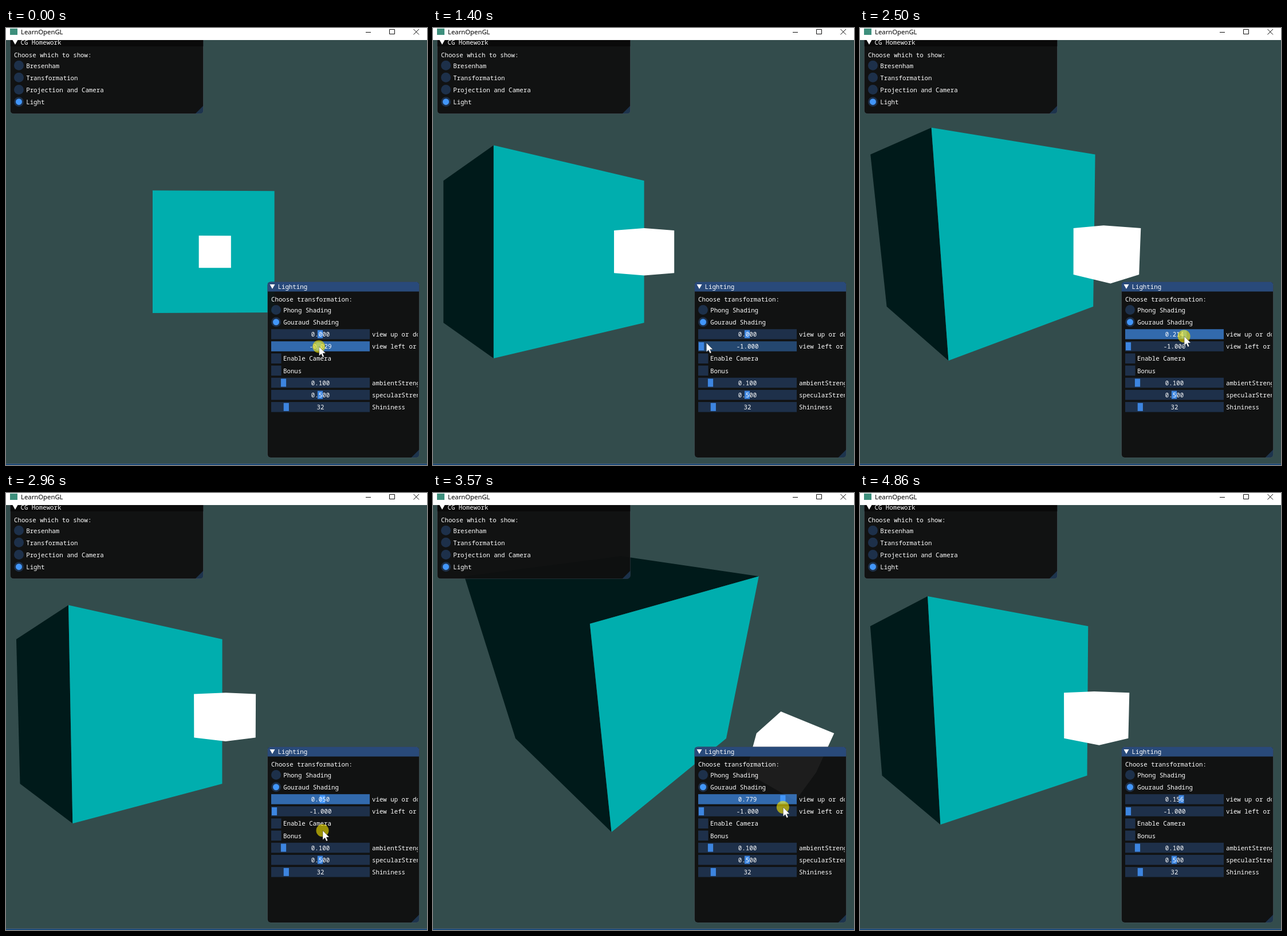
Write an HTML page with a canvas that moves like this. It is 735 px wide and 762 px high and loops after 5.15 s.

```html
<!DOCTYPE html>
<html lang="en">
<head>
<meta charset="utf-8">
<title>LearnOpenGL</title>
<style>
  html, body { margin: 0; width: 100%; height: 100%; overflow: hidden; background: #334c4c; }
  canvas { display: block; }
</style>
</head>
<body>
<canvas id="stage" width="735" height="762"></canvas>
<script>
const ctx = document.getElementById('stage').getContext('2d');
const LOOP = 5150, STEP = 76.73, FIRST_STEP = 12;
const UI_FONT = '10.75px "Noto Sans Mono", "DejaVu Sans Mono", monospace';
const BLUE = '#4296fa', GRAB = '#3d85e0';
const FRAME = 'rgba(41,74,122,.54)', FRAME_HOVER = 'rgba(66,150,250,.4)', FRAME_ACTIVE = 'rgba(66,150,250,.67)';
const ROW = 21.16, SLIDER_MIDDLE = 548.5, SLIDER_REACH = 80;

// Key points of the pointer: [step, x, y]. A dragged slider follows x.
const POINTER_PATH = [
  [0, 546.18, 555], [3, 615, 557], [7, 615, 557], [10, 524.02, 559], [15, 423, 559],
  [22, 548.5, 534], [26, 564.66, 534], [29, 605.3, 535], [30, 605.3, 535], [32, 565.62, 537],
  [36, 550, 595], [38, 552.5, 588], [42, 600.74, 547], [43, 620.5, 547], [45, 620.5, 547],
  [50, 572.1, 549], [52, 560.98, 551], [59, 679, 740], [62, 679, 763]];

const clamp = (v, lo, hi) => Math.min(hi, Math.max(lo, v));

function pointerAt(step) {
  const next = POINTER_PATH.findIndex(key => key[0] > step);
  const [s1, x1, y1] = POINTER_PATH.at(next);
  if (next < 0) return { x: x1, y: y1 };
  const [s0, x0, y0] = POINTER_PATH[next - 1];
  const f = (step - s0) / (s1 - s0);
  return { x: x0 + (x1 - x0) * f, y: y0 + (y1 - y0) * f };
}

const grabX = value => SLIDER_MIDDLE + SLIDER_REACH * value;
const valueAt = step => clamp((pointerAt(step).x - SLIDER_MIDDLE) / SLIDER_REACH, -1, 1);

function rect(x, y, w, h, color) {
  ctx.fillStyle = color;
  ctx.fillRect(x, y, w, h);
}

function tracePolygon(points) {
  points.forEach(([x, y], i) => i ? ctx.lineTo(x, y) : ctx.moveTo(x, y));
  ctx.closePath();
}

function polygon(points, color) {
  ctx.beginPath();
  tracePolygon(points);
  ctx.fillStyle = color;
  ctx.fill();
}

function disc(x, y, r, color) {
  ctx.beginPath();
  ctx.arc(x, y, r, 0, 7);
  ctx.fillStyle = color;
  ctx.fill();
}

function label(text, x, middle, align = 'left') {
  ctx.font = UI_FONT;
  ctx.fillStyle = '#fff';
  ctx.textAlign = align;
  ctx.fillText(text, x, middle + 4);
}

// Scene -------------------------------------------------------------

function makeCamera(left, up) {
  const pos = [left, up, 3 - Math.abs(left) - Math.abs(up)];
  const yaw = -left * Math.PI / 4, pitch = up * Math.PI / 4;
  const focal = 368 / Math.tan(35 * Math.PI / 180);
  const project = point => {
    const [x, y, z] = point.map((v, i) => v - pos[i]);
    const side = x * Math.cos(yaw) + z * Math.sin(yaw);
    const ahead = x * Math.sin(yaw) - z * Math.cos(yaw);
    const depth = ahead * Math.cos(pitch) - y * Math.sin(pitch);
    const rise = ahead * Math.sin(pitch) + y * Math.cos(pitch);
    return [368.6 + focal * side / depth, 390.2 - focal * rise / depth];
  };
  return { pos, project };
}

// Fills the faces of a box that look at the camera, for the given axes, as one shape.
function drawFaces(camera, center, size, axes, color) {
  const half = size / 2;
  ctx.beginPath();
  for (const axis of axes) {
    const toCamera = camera.pos[axis] - center[axis];
    if (Math.abs(toCamera) <= half) continue;
    const sign = Math.sign(toCamera);
    tracePolygon([[-1, -1], [-1, 1], [1, 1], [1, -1]].map(([a, b]) => {
      const p = [...center];
      p[axis] += sign * half;
      p[(axis + 1) % 3] += a * sign * half;
      p[(axis + 2) % 3] += b * half;
      return camera.project(p);
    }));
  }
  ctx.fillStyle = color;
  ctx.fill();
}

function drawScene(left, up) {
  const camera = makeCamera(left, up);
  rect(0, 0, 735, 762, '#334c4c');
  drawFaces(camera, [0, 0, 0], 1, [0, 1], '#001a1a');
  drawFaces(camera, [0, 0, 0], 1, [2], '#00aeae');
  drawFaces(camera, [0, 0, 1], .2, [0, 1, 2], '#fff');
}

// Interface ---------------------------------------------------------

function panel(x, y, w, h, titleH, titleColor, title, titleMiddle) {
  const r = x + w, b = y + h, m = titleMiddle;
  ctx.save();
  ctx.beginPath();
  ctx.roundRect(x, y, w, h, 6);
  ctx.strokeStyle = 'rgba(110,110,128,.35)';
  ctx.lineWidth = 1;
  ctx.stroke();
  ctx.clip();
  rect(x, y, w, h, 'rgba(15,15,15,.94)');
  rect(x, y, w, titleH, titleColor);
  polygon([[r, b - 14], [r, b], [r - 14, b]], 'rgba(66,150,250,.25)');
  ctx.restore();
  polygon([[x + 4, m - 4], [x + 13, m - 4], [x + 8.5, m + 4]], '#fff');
  label(title, x + 18, m);
}

function radio(text, x, y, selected) {
  disc(x, y, 8.5, FRAME);
  if (selected) disc(x, y, 5.5, BLUE);
  label(text, x + 12.7, y + .5);
}

function checkbox(text, y) {
  rect(463, y - 8.75, 17.5, 17.5, FRAME);
  label(text, 484, y + .2);
}

function slider(name, text, value, y, active, pointer) {
  const hover = !pointer.down && Math.abs(pointer.x - 549) < 86 && Math.abs(pointer.y - y) < 9;
  rect(463, y - 8.75, 172, 17.5, active ? FRAME_ACTIVE : hover ? FRAME_HOVER : FRAME);
  rect(grabX(value) - 4.6, y - 7, 9.2, 14, active ? BLUE : GRAB);
  label(text, 549, y, 'center');
  label(name, 639, y + .2);
}

function drawTitleBar() {
  rect(0, 0, 735, 21, '#fff');
  rect(7, 1, 13, 11, '#3d8f7c');
  ctx.font = '11.3px "Noto Sans", "Open Sans", sans-serif';
  ctx.fillStyle = '#000';
  ctx.textAlign = 'left';
  ctx.fillText('LearnOpenGL', 26, 11);
  ctx.strokeStyle = '#111';
  ctx.lineWidth = 1;
  ctx.beginPath();
  ctx.moveTo(628, 7.5); ctx.lineTo(637, 7.5);
  ctx.rect(669.5, 2.5, 9, 8);
  ctx.moveTo(711.5, 2); ctx.lineTo(721, 11.5);
  ctx.moveTo(721, 2); ctx.lineTo(711.5, 11.5);
  ctx.stroke();
}

function drawMenu() {
  panel(7.5, 12, 337, 137.5, 20, '#0a0a0a', 'CG Homework', 25);
  label('Choose which to show:', 14, 47);
  ['Bresenham', 'Transformation', 'Projection and Camera', 'Light']
    .forEach((text, i) => radio(text, 22.5, 65.2 + i * ROW, i === 3));
}

function drawLighting(left, up, dragging, pointer) {
  const row = i => 491.6 + i * ROW;
  panel(456.5, 442.5, 265, 306.5, 17, '#294a7a', 'Lighting', 451);
  ctx.save();
  ctx.beginPath();
  ctx.rect(457, 443, 262, 306);
  ctx.clip();
  label('Choose transformation:', 463, 473);
  radio('Phong Shading', 471.5, row(0), false);
  radio('Gouraud Shading', 471.5, row(1), true);
  slider('view up or down', up.toFixed(3), up, row(2), dragging === 'up', pointer);
  slider('view left or right', left.toFixed(3), left, row(3), dragging === 'left', pointer);
  checkbox('Enable Camera', row(4));
  checkbox('Bonus', row(5));
  slider('ambientStrength', '0.100', -.8, row(6), false, pointer);
  slider('specularStrength', '0.500', 0, row(7), false, pointer);
  slider('Shininess', '32', -.74, row(8), false, pointer);
  ctx.restore();
}

function drawPointer({ x, y, down }) {
  if (down) disc(x, y + .5, 11, 'rgba(250,232,0,.6)');
  const arrow = [[0, 0], [0, 16], [3.7, 12.5], [6.2, 18.3], [8.7, 17.2], [6.3, 11.6], [11.3, 11.4]];
  polygon(arrow.map(([dx, dy]) => [x + dx + .5, y + dy + .7]), '#fff');
  ctx.strokeStyle = 'rgba(0,0,0,.6)';
  ctx.lineWidth = .6;
  ctx.stroke();
}

function draw(step) {
  const left = valueAt(Math.min(step, 15));
  const up = valueAt(clamp(step, 22, 52));
  const dragging = step < 16 ? 'left' : step >= 23 && step < 53 ? 'up' : '';
  const pointer = { ...pointerAt(step), down: dragging !== '' };

  drawScene(left, up);
  drawMenu();
  drawTitleBar();
  drawLighting(left, up, dragging, pointer);
  rect(0, 759, 735, 1, '#4a5a66');
  rect(0, 760, 735, 2, '#1c4a78');
  drawPointer(pointer);
}

function tick() {
  const t = performance.now() % LOOP;
  draw(Math.max(0, Math.floor((t - FIRST_STEP) / STEP)));
  requestAnimationFrame(tick);
}
tick();
</script>
</body>
</html>
```
